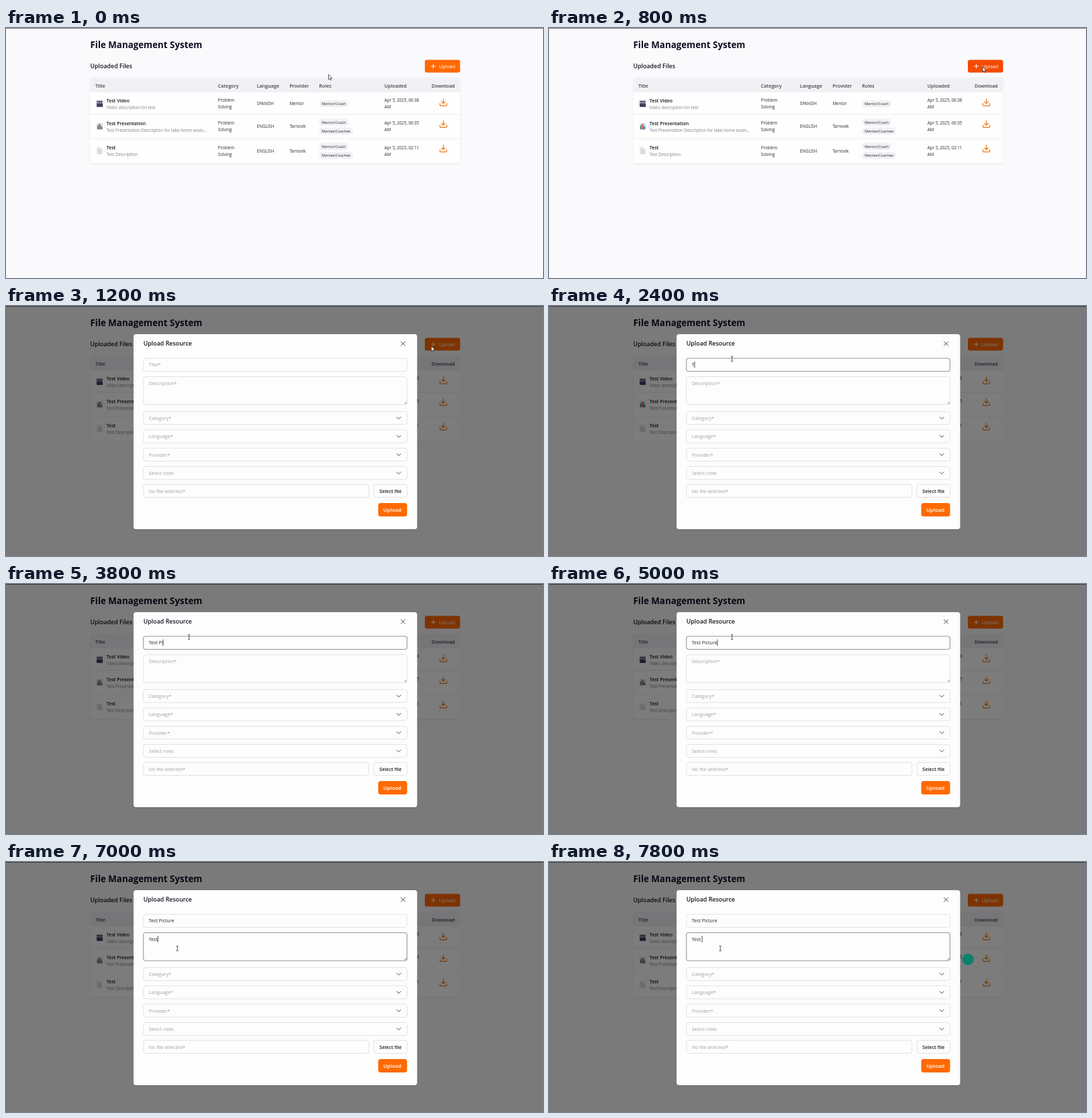
Write an HTML page that moves like this. It is 800x373 px and loops after 8 s.

```html
<!DOCTYPE html>
<html lang="en">
<head>
<meta charset="utf-8">
<title>File Management System</title>
<style>
html, body { margin: 0; width: 100%; height: 100%; overflow: hidden; background: #fafafc; }
svg { display: block; width: 100%; height: 100%; }
text { font-family: "Open Sans", "Noto Sans", sans-serif; font-size: 6.2px; fill: #2a2a35; white-space: pre; }
.title { font-size: 13.33px; font-weight: 700; fill: #0e0e22; }
.sub { font-size: 8.85px; font-weight: 600; fill: #15151f; }
.head { font-size: 7.15px; font-weight: 600; fill: #41414d; }
.name { font-size: 6.95px; font-weight: 600; fill: #15151f; }
.desc { fill: #82828c; }
.role { font-size: 5.4px; font-weight: 500; }
.hint { font-size: 7.1px; fill: #a0a0a8; }
.typed { font-size: 7.05px; fill: #25252d; }
.btn { font-size: 7.15px; font-weight: 500; fill: #fff; }
.file { font-size: 7.15px; font-weight: 600; fill: #1c1c24; }
.send { font-size: 7.9px; font-weight: 600; fill: #fff; }
.field { fill: #fdfdfe; stroke: #dcdce1; stroke-width: .8; }
.field.on { stroke: #97979d; stroke-width: 1.1; }
.line { fill: none; stroke: #34343e; stroke-width: .9; stroke-linecap: round; stroke-linejoin: round; }
</style>
</head>
<body>
<svg viewBox="0 0 800 373" preserveAspectRatio="none">
  <defs>
    <clipPath id="inside"><rect x="190" y="42" width="422.5" height="291" rx="4"/></clipPath>
    <filter id="soft" x="-5%" y="-5%" width="110%" height="112%">
      <feDropShadow dx="0" dy="1" stdDeviation="1" flood-opacity=".1"/>
    </filter>
    <path id="down" d="M21 15v4a2 2 0 0 1-2 2H5a2 2 0 0 1-2-2v-4M7 10l5 5 5-5M12 15V3"
      transform="scale(.56) translate(-12 -12)" fill="none" stroke="#ea7a16" stroke-width="2.1"
      stroke-linecap="round" stroke-linejoin="round"/>
  </defs>
  <rect width="800" height="373" fill="#fafafc"/>
  <rect width="800" height="1" fill="#77777b"/>
  <text class="title" x="125.5" y="29.7">File Management System</text>
  <text class="sub" x="125.5" y="60.3">Uploaded Files</text>
  <rect id="add" x="624" y="47.5" width="52.5" height="19" rx="3"/>
  <path d="M633.2 57h6.6M636.5 53.7v6.6" stroke="#fff"/>
  <text class="btn" x="645" y="59.7">Upload</text>
  <rect x="125.5" y="74" width="551" height="127.5" rx="3.5" fill="#fefefe" filter="url(#soft)"/>
  <path d="M125.5 96V77.5a3.5 3.5 0 0 1 3.5-3.5h544a3.5 3.5 0 0 1 3.5 3.5V96Z" fill="#f1f1f5"/>
  <path d="M125.5 128.7h551M125.5 165h551" stroke="#e6e6eb" stroke-width=".7"/>
  <g id="cells"></g>
  <rect id="shade" width="800" height="373"/>
  <g id="modal">
    <rect x="190" y="42" width="422.5" height="291" rx="4" fill="#fdfdfe" filter="url(#soft)"/>
    <text class="sub" x="204.8" y="59.4">Upload Resource</text>
    <path class="line" d="M588.5 53.2l6 6m0-6l-6 6"/>
    <g id="form"></g>
    <path d="M593.6 146l3-3M595.4 146.2l1.3-1.3" stroke="#55555d" stroke-width=".7"/>
    <text class="file" x="556.3" y="278.7">Select file</text>
    <rect x="554.5" y="294" width="43" height="20" rx="3.5" fill="#ff6900"/>
    <text class="send" x="562" y="307.2">Upload</text>
    <text id="name" class="typed" x="212.7" y="90.3"/>
    <text id="about" class="typed" x="212.7" y="118"/>
    <path id="caret" stroke="#222" stroke-width=".8"/>
  </g>
  <use id="ghost" href="#cells" clip-path="url(#inside)"/>
  <circle id="badge" cx="624.3" cy="145.3" r="8.6" fill="#0d806c"/>
  <path id="arrow" d="M0 0V7.3L1.7 5.8 2.9 8.4 4.1 7.9 2.9 5.4H5.3Z" fill="#fff" stroke="#22222a" stroke-width=".7"/>
  <path id="beam" d="M-1.6-3.8Q0-3.8 0-2.8Q0-3.8 1.6-3.8M0-3V3M-1.6 3.8Q0 3.8 0 2.8Q0 3.8 1.6 3.8" fill="none" stroke="#33333b" stroke-width=".8"/>
</svg>
<script>
const $ = id => document.getElementById(id);
const add = (id, markup) => $(id).insertAdjacentHTML('beforeend', markup);
const label = (cls, x, y, s) => `<text class="${cls}" x="${x}" y="${y}">${s}</text>`;
const box = (x, y, w, h, fill, r = 0) =>
  `<rect x="${x}" y="${y}" width="${w}" height="${h}" rx="${r}" fill="${fill}"/>`;

// Table
const icons = [
  box(-4.5, -1.5, 9, 6.3, '#3d3a5c', .6) + box(-4.5, -4.6, 9, 2.6, '#3d3a5c', .4) +
    '<path d="M-3-2l1.3-2.6M0-2l1.3-2.6M3-2l1.3-2.6M-3-1.3l1 1.6M0-1.3l1 1.6M3-1.3l1 1.6" stroke="#d8d6e6" stroke-width=".8"/>',
  box(-4.5, -4.7, 9, 9.4, '#cfd9e6', 1) + box(-3.6, -1.5, 2, 5.6, '#36a05c') +
    box(-1, -3.8, 2, 7.9, '#d8414e') + box(1.6, 0, 2, 4.1, '#2f78c4'),
  '<path d="M-3.6-4.6H1.4L3.6-2.4V4.6H-3.6Z" fill="#eeeef2" stroke="#c6c6ce" stroke-width=".6"/>' +
    '<path d="M-2.2-2.2H.8M-2.2-.5H2.2M-2.2 1.2H2.2M-2.2 2.9H2.2" stroke="#a9a9b3" stroke-width=".6"/>'
];
const heads = { Title: 133, Category: 315.8, Language: 373.8, Provider: 422.4, Roles: 466.3, Uploaded: 563.8, Download: 634 };
for (const [s, x] of Object.entries(heads)) add('cells', label('head', x, 88.6, s));

const pill = (y, s, w) => box(466.3, y - 5.3, w, 10.6, '#f1f1f5', 5.3) + label('role', 470.3, y + 2, s);
const rows = [
  [113, 111, 'Test Video', 'Video description for test', 'SPANISH', 'Mentor', '06:38'],
  [147, 143.3, 'Test Presentation', 'Test Presentation Description for take-home asses…', 'ENGLISH', 'Tarnovik', '06:35'],
  [183.3, 179.8, 'Test', 'Test Description', 'ENGLISH', 'Tarnovik', '02:11']
];
rows.forEach(([y, iconY, name, desc, lang, from, time], i) => add('cells',
  `<g transform="translate(139.6 ${y})">${icons[i]}</g>` +
  label('name', 149.8, y - 2, name) + label('desc', 149.8, y + 7.7, desc) +
  label('', 315.8, y - 2.7, 'Problem') + label('', 315.8, y + 7.2, 'Solving') +
  label('', 373.8, y + 2.3, lang) + label('', 422.4, y + 2.3, from) +
  (i ? pill(y - 6.5, 'Mentor/Coach', 44) + pill(y + 6.8, 'Mentee/Coachee', 51) : pill(y, 'Mentor/Coach', 44)) +
  label('', 563.8, y - 2.7, `Apr 5, 2025, ${time}`) + label('', 563.8, y + 7.2, 'AM') +
  `<use href="#down" x="651.6" y="${iconY}"/>`));

// Form
const field = (id, x, y, w, h) => `<rect id="${id}" class="field" x="${x}" y="${y}" width="${w}" height="${h}" rx="3.2"/>`;
const hint = (id, y, s) => `<text id="${id}" class="hint" x="212.7" y="${y}">${s}</text>`;
add('form', field('nameBox', 204.7, 78, 392.7, 19.5) + hint('nameHint', 90.3, 'Title*') +
  field('aboutBox', 204.7, 105.5, 392.7, 41.7) + hint('aboutHint', 118, 'Description*'));
['Category*', 'Language*', 'Provider*', 'Select roles'].forEach((s, i) => {
  const y = 157.5 + i * 27.3;
  add('form', field('pick' + i, 204.7, y, 392.7, 19.3) + hint('pickHint' + i, y + 12.4, s) +
    `<path class="line" d="M582.2 ${y + 8.3}l2.9 2.9 2.9-2.9"/>`);
});
add('form', field('fileBox', 204.7, 266.2, 336, 19.3) + hint('fileHint', 278.7, 'No file selected*') +
  field('fileBtn', 548, 266.2, 49.5, 19.3));

// Motion: [time, x, y] for the pointer, key times for the typing
const path = [[0, 480.5, 69.5], [800, 646, 58], [1000, 646, 58], [1200, 633.7, 60], [2000, 272.6, 79],
  [5400, 272.6, 79], [5800, 255.2, 129], [8000, 255.2, 129]];
const nameKeys = [2400, 2800, 3000, 3200, 3400, 3600, 3800, 4200, 4400, 4600, 4800, 5000];
const aboutKeys = [6400, 6600, 6800, 7000, 7200];

function pointer(t) {
  const i = path.findIndex(p => p[0] > t);
  const [t0, x0, y0] = path[i - 1], [t1, x1, y1] = path[i];
  const u = (t - t0) / (t1 - t0), k = u * u * (3 - 2 * u);
  return [x0 + (x1 - x0) * k, y0 + (y1 - y0) * k];
}
const show = (id, on) => $(id).setAttribute('visibility', on ? 'visible' : 'hidden');
const typed = (s, keys, t) => s.slice(0, keys.filter(k => k <= t).length);

function fill(id, s, focus, y) {
  $(id).textContent = s;
  show(id + 'Hint', !s);
  $(id + 'Box').classList.toggle('on', focus);
  if (focus) {
    const x = 213 + (s ? $(id).getComputedTextLength() : 0);
    $('caret').setAttribute('d', `M${x} ${y - 4.8}v9.6`);
  }
}

function draw(t) {
  const fade = t < 1000 ? 0 : t < 1200 ? .5 : 1;
  $('shade').setAttribute('opacity', fade * .51);
  $('modal').setAttribute('opacity', fade);
  show('ghost', fade === .5);
  $('add').setAttribute('fill', t >= 600 && t < 1200 ? '#f54a00' : '#ff6900');
  fill('name', typed('Test Picture', nameKeys, t), t >= 2200 && t < 6000, 87.6);
  fill('about', typed('Test ', aboutKeys, t), t >= 6000, 115);
  show('caret', t >= 2200);
  show('badge', t >= 7200);
  const at = `translate(${pointer(t)})`, text = t >= 1800;
  $('arrow').setAttribute('transform', at);
  $('beam').setAttribute('transform', at);
  show('arrow', !text);
  show('beam', text);
}

const start = performance.now();
function tick() {
  const t = (performance.now() - start) % 8000;
  draw(Math.floor(t / 200) * 200);
  requestAnimationFrame(tick);
}
tick();
</script>
</body>
</html>
```
